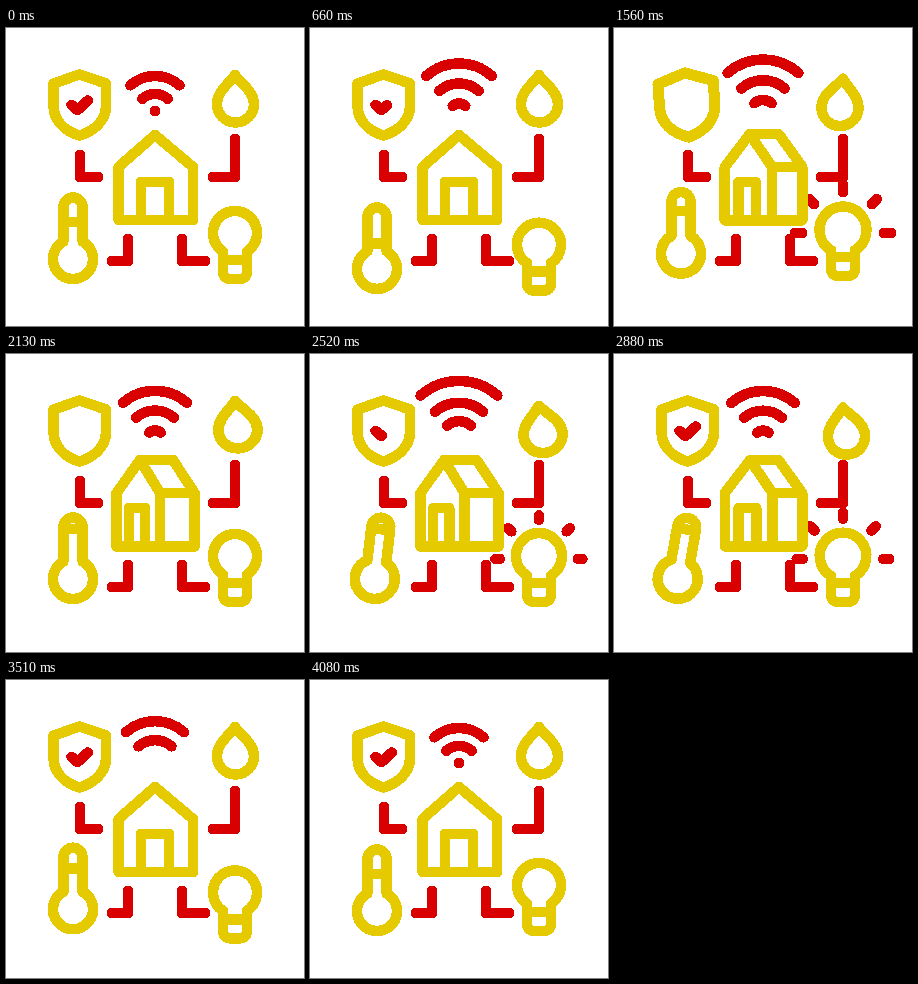
These frames come from a looping animation (298x298 px, 4.5 s). An HTML page:

```html
<!DOCTYPE html>
<html lang="en">
<head>
<meta charset="utf-8">
<title>Smart home</title>
<style>
html, body { margin: 0; width: 100%; height: 100%; overflow: hidden; background: #fff; }
svg { display: block; width: 100vw; height: 100vh; shape-rendering: crispEdges; }
g, path { fill: none; stroke-width: 10.5; stroke-linecap: round; stroke-linejoin: round; }
.gold { stroke: #e6ca00; }
.red { stroke: #d80000; }
</style>
</head>
<body>
<svg viewBox="0 0 298 298">
  <g class="red">
    <path d="M74 127V149H92M229 111V149H207M122 211V233H106M176 211V233H199"/>
    <path id="wifi"/>
    <path id="rays"/>
  </g>
  <g class="gold">
    <path id="house"/>
    <g id="shield">
      <path d="M73.5 46.5L47.5 55.5V78C47.5 92 58 103 73.5 107.500C89 103 100 92 100 78V55.5Z"/>
      <path id="check" class="red" d="M65.5 77L71.5 82L82 72.5" pathLength="100"/>
    </g>
    <path id="drop" d="M229 47C224 55 211 63 211 76A18.5 18.5 0 0 0 248 76C248 63 234 55 229 47Z"/>
    <g id="thermo">
      <path d="M57.5 213.4V179A9.5 9.5 0 0 1 76.5 179V213.4A20 20 0 1 1 57.5 213.4Z"/>
      <path id="level"/>
    </g>
    <path id="bulb"/>
  </g>
</svg>
<script>
const LOOP = 4500, STEP = 30, START = 330, END = 4080, MID = (START + END) / 2;
const el = {};
document.querySelectorAll('[id]').forEach(n => el[n.id] = n);
const set = (id, name, value) => el[id].setAttribute(name, value);

// Progress from a to b: linear, eased, and out-and-back.
const part = (t, a, b) => Math.min(1, Math.max(0, (t - a) / (b - a)));
const ease = (t, a, b) => { const u = part(t, a, b); return u * u * (3 - 2 * u); };
const bump = (t, a, b) => Math.sin(Math.PI * part(t, a, b));
const hold = (t, a, b, c, d) => ease(t, a, b) - ease(t, c, d);

function arc(r) {
  const a = 41.5 * Math.PI / 180, x = r * Math.sin(a), y = 85 - r * Math.cos(a);
  return `M${149 - x} ${y}A${r} ${r} 0 0 1 ${149 + x} ${y}`;
}

// Rings spread outwards five times while everything moves.
function drawWifi(t) {
  const moving = t >= START && t < END;
  const p = moving ? (t - START + STEP) / (END - START + STEP) * 5 % 1 : 0;
  const lift = 2 * Math.sin(Math.PI * p);
  let d = arc(37 + 22 * p + lift) + arc(19 + 18 * p + lift);
  if (!moving) d += 'M149 83h.01';
  else if (p > 0.32) d += arc(1 + 18 * p);
  set('wifi', 'd', d);
}

// The house turns to show its side, then turns back the same way.
function drawHouse(t) {
  const u = part(Math.abs(t - MID), 0, 1305);
  const q = 1 - u ** 3;
  const left = 112.5 - 2 * q, edge = 187 - 33 * q, right = 187 + 1.5 * q;
  const front = 149 - 15 * q, back = 149 + 18 * q;
  const top = 107 - q, base = 192 + q / 2;
  set('house', 'd',
    `M${left} ${base}V139L${front} ${top}L${edge} 139V${base}Z` +
    `M${front} ${top}H${back}L${right} 139V${base}H${edge}M${edge} 139H${right}` +
    `M${135 - 12 * q} ${base}V154H${163 - 24 * q}V${base}`);
}

function drawShield(t) {
  const u = part(t, 840, 1900);
  const swing = Math.sin(Math.PI * (1 - (1 - u) ** 2));
  set('shield', 'transform',
    `translate(${73.5 - 2 * swing} 77) rotate(${-12 * swing}) scale(${1 + 0.17 * swing}) translate(-73.5 -77)`);
  const shown = 1 - hold(t, 480, 960, 2340, 2760);
  set('check', 'stroke-dasharray', `${100 * shown} 200`);
  set('check', 'visibility', shown > 0.01 ? 'visible' : 'hidden');
}

function drawDrop(t) {
  const out = bump(t, 720, 1740);
  const turn = 13 * out - 7 * bump(t, 1740, 3420);
  const y = 7 * out + 6.5 * bump(t, 2200, 3420);
  const wide = 1 + 0.06 * bump(t, 1740, 2880);
  set('drop', 'transform',
    `translate(229 ${47 + y}) rotate(${turn}) scale(${wide} 1) translate(-229 -47)`);
}

function drawThermo(t) {
  const dip = bump(t, START, 1400);
  const y = 12 * dip - 6 * hold(t, 1400, 1600, 3000, 3800);
  set('thermo', 'transform', `translate(0 ${y}) rotate(${10 * bump(t, 2250, 3420)} 67 212)`);
  set('level', 'd', `M58 ${194 + 14 * dip - 13 * hold(t, 1350, 1800, 3000, 3800)}H76`);
}

function drawBulb(t) {
  const glow = bump(t, 1110, 2010) + bump(t, 2340, 3150);
  const r = 22 + 1.5 * glow, dx = 12, dy = Math.sqrt(r * r - dx * dx);
  const y = 12 * bump(t, START, 1100) - 3 * hold(t, 900, 1140, 3000, 3200) + 7.5 * bump(t, 3050, END);
  set('bulb', 'd',
    `M217 ${205 + dy}A${r} ${r} 0 1 1 241 ${205 + dy}V243Q241 251 233 251H225Q217 251 217 243ZM217 232H241`);
  set('bulb', 'transform', `translate(0 ${y})`);

  let d = '';
  if (glow > 0.001) for (let i = 0; i < 5; i++) {
    const a = i * Math.PI / 4, c = Math.cos(a), s = Math.sin(a);
    const r1 = 35.5 + 5.5 * glow, r2 = 35.51 + 12.5 * glow;
    d += `M${229 + r1 * c} ${205 - r1 * s}L${229 + r2 * c} ${205 - r2 * s}`;
  }
  set('rays', 'd', d);
  el.rays.style.strokeWidth = 10.5 * Math.min(1, glow * 12);
}

function draw(t) {
  for (const part of [drawWifi, drawHouse, drawShield, drawDrop, drawThermo, drawBulb]) part(t);
}

const begin = performance.now();
function tick() {
  const t = (performance.now() - begin) % LOOP;
  draw(Math.floor(t / STEP) * STEP);
  requestAnimationFrame(tick);
}
tick();
</script>
</body>
</html>
```
